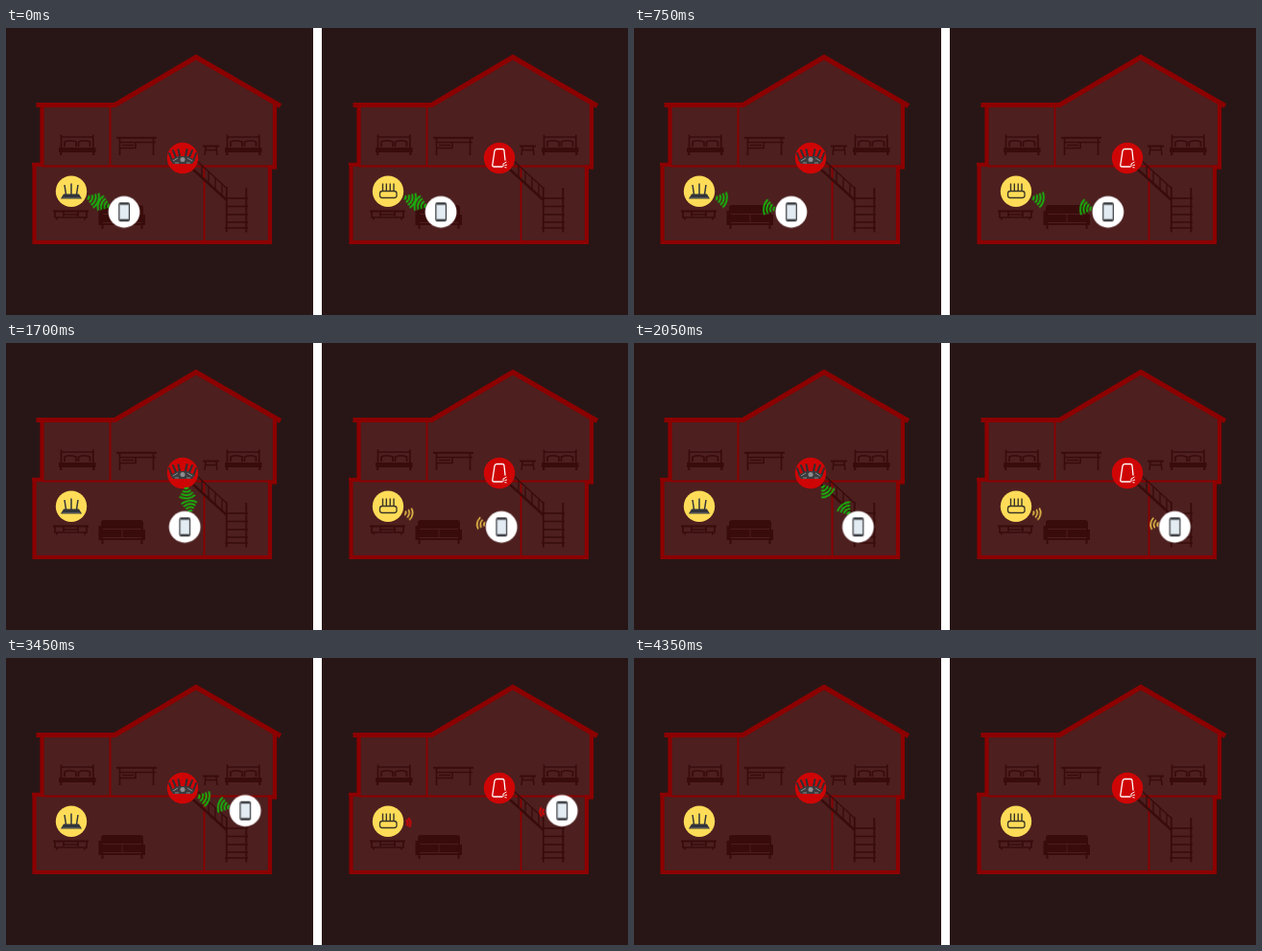
An HTML page without scripts that plays this animation: 648x300 px, repeating every 5250 ms.

```html
<!DOCTYPE html>
<html lang="en">
<head>
<meta charset="utf-8">
<title>Home coverage</title>
<style>
html, body { margin: 0; width: 100%; height: 100%; overflow: hidden; background: #fff; }
svg { display: block; }
.live, .live * { animation: 5250ms linear infinite; }
.live { animation-name: leave; }
.live .phone { animation-name: walk; }
.live .near { animation-name: near; }
.live .far { animation-name: far; }
.live .hub { animation-name: hub; }
.live .toHub { animation-name: toHub; }
.live .strong { animation-name: strong; }
.live .boost { animation-name: boost; }
.live .fair { animation-name: fair; }
.live .weak { animation-name: weak; }

@keyframes walk {
  0% { transform: translate(123px, 192.3px); animation-timing-function: cubic-bezier(.3, .25, .55, 1); }
  15.9% { transform: translate(164.4px, 192.3px); }
  25.71% { transform: translate(164.4px, 192.3px); animation-timing-function: ease-in-out; }
  44.76% { transform: translate(249.2px, 192.3px); }
  57.14% { transform: translate(249.2px, 192.3px); animation-timing-function: ease-in-out; }
  76.19%, 100% { transform: translate(249.2px, 113.8px); }
}
@keyframes leave {
  0%, 77.14% { opacity: 1; }
  82.86%, 100% { opacity: 0; }
}
/* waves at the main router, and the phone's waves towards it */
@keyframes near {
  0% { transform: translate(82.5px, 176px) rotate(21deg); animation-timing-function: ease-out; }
  15.9%, 25.71% { transform: translate(82.5px, 177px) rotate(12deg); }
  44.76% { transform: translate(82.5px, 177.5px) rotate(7deg); }
  57.14% { transform: translate(82.5px, 177.5px) rotate(7deg); animation-timing-function: ease-in; }
  65.71% { transform: translate(82.5px, 172.5px) rotate(-4deg); animation-timing-function: ease-out; }
  74.29%, 100% { transform: translate(82.5px, 168px) rotate(-17deg); }
}
@keyframes far {
  0% { transform: translate(-13px, -5px) rotate(201deg); animation-timing-function: ease-out; }
  15.9%, 25.71% { transform: translate(-14.5px, -2.5px) rotate(192deg); }
  44.76% { transform: translate(-14px, -2px) rotate(187deg); }
  57.14% { transform: translate(-14px, -2px) rotate(187deg); animation-timing-function: ease-in; }
  65.71% { transform: translate(-14px, 1px) rotate(177deg); animation-timing-function: ease-out; }
  74.29%, 100% { transform: translate(-14px, 7px) rotate(163deg); }
}
/* waves at the upstairs hub, and the phone's waves towards it */
@keyframes hub {
  0%, 25.71% { transform: translate(186px, 148px) rotate(105deg); }
  32.38% { transform: translate(187.5px, 148px) rotate(84deg); animation-timing-function: ease-out; }
  44.76% { transform: translate(197.7px, 146.7px) rotate(43deg); }
  57.14% { transform: translate(197.7px, 146.7px) rotate(43deg); animation-timing-function: ease-in; }
  65.71% { transform: translate(197.6px, 143.8px) rotate(17deg); animation-timing-function: ease-out; }
  74.29%, 100% { transform: translate(197.6px, 132.7px) rotate(-17deg); }
}
@keyframes toHub {
  0%, 25.71% { transform: translate(10px, -12px) rotate(285deg); }
  32.38% { transform: translate(6px, -13px) rotate(264deg); animation-timing-function: ease-out; }
  44.76% { transform: translate(-13px, -11px) rotate(223deg); }
  57.14% { transform: translate(-13px, -11px) rotate(223deg); animation-timing-function: ease-in; }
  65.71% { transform: translate(-14px, -3px) rotate(195deg); animation-timing-function: ease-out; }
  74.29%, 100% { transform: translate(-14px, 10px) rotate(163deg); }
}
@keyframes strong {
  0%, 24.76% { opacity: 1; }
  28.57%, 100% { opacity: 0; }
}
@keyframes boost {
  0%, 24.76% { opacity: 0; }
  28.57%, 100% { opacity: 1; }
}
@keyframes fair {
  0%, 24.76% { opacity: 0; }
  28.57%, 44.76% { opacity: 1; }
  50.48%, 100% { opacity: 0; }
}
@keyframes weak {
  0%, 44.76% { opacity: 0; }
  50.48%, 100% { opacity: 1; }
}
</style>
</head>
<body>
<svg width="648" height="300" viewBox="0 0 648 300" fill="none">
  <defs>
    <g id="green" stroke="#17b50d" stroke-width="1.9">
      <path d="M3.3-2.3A4 4 0 0 1 3.3 2.3M6.2-4.3A7.5 7.5 0 0 1 6.2 4.3M9-6.3A11 11 0 0 1 9 6.3M11.9-8.3A14.5 14.5 0 0 1 11.9 8.3"/>
    </g>
    <g id="yellow" stroke="#f2c94c" stroke-width="1.5">
      <path d="M3.3-2.3A4 4 0 0 1 3.3 2.3M6.2-4.3A7.5 7.5 0 0 1 6.2 4.3M9-6.3A11 11 0 0 1 9 6.3"/>
    </g>
    <g id="red" stroke="#cf0808" stroke-width="2">
      <path d="M4.9-3.2A6 6 0 0 1 4.9 3.2M7.2-4.9A8.7 8.7 0 0 1 7.2 4.9"/>
    </g>

    <g id="handset">
      <circle r="16.4" fill="#fff"/>
      <rect x="-5.2" y="-9.5" width="10.6" height="19" rx="1.4" fill="#e4ecf3" stroke="#36383c" stroke-width="1.2"/>
      <path d="M-4.6-8.3H4.8M-4.6 8.3H4.8" stroke="#36383c" stroke-width="1.4"/>
    </g>

    <g id="bed" stroke="#390c0c">
      <path d="M57.5 126V111.5M90.8 126V111.5M57 114H91M61 124V119Q66 116.500 73 119V124M75.500 124V119Q82 116.500 87.500 119V124" stroke-width="1.7"/>
      <path d="M55 127.500H93.500" stroke-width="5"/>
      <path d="M57.200 129V133M91.300 129V133" stroke-width="2.200"/>
    </g>

    <g id="house">
      <path d="M38 80H113L198 30L280 80V145H275V224H29V143H38Z" fill="#4d1f1f"/>
      <path d="M108.500 80V144M38 144.500H278M206.500 144V223" stroke="#8c0000" stroke-width="1.8"/>

      <use href="#bed"/>
      <use href="#bed" x="173"/>
      <g stroke="#390c0c">
        <path d="M115 114.800H157" stroke-width="2"/>
        <path d="M118.500 115V133M153.500 115V133M118 119.500H156M119 125.500H135V120M121 122.500H133" stroke-width="1.6"/>
        <path d="M205 123.500H222" stroke-width="2"/>
        <path d="M208 124L207 133M219 124L220 133M208 127.500H219" stroke-width="1.5"/>
        <path d="M49 191.500H86" stroke-width="2"/>
        <path d="M51 191V198H84V191M60 192V197M75 192V197M60 195H75M53 198V200.500M82 198V200.500" stroke-width="1.7"/>
        <path d="M195 148L230 180" stroke-width="2.400"/>
        <path d="M199 139L230 167.500M204 144V155M211 150.500V162M218 157V168M225 163V175" stroke-width="1.3"/>
        <path d="M229.800 166V213.500M250.300 167V213.500" stroke-width="1.800"/>
        <path d="M228 178H252M229 186.500H252M229 195H252M229 203H252M228 209H252" stroke-width="1.5"/>
      </g>
      <path d="M99 195V188Q99 185 102 185H140Q143 185 143 188V195H145V206H142.500V210H140.500V206H101.500V210H99.500V206H96.500V191H99Z" fill="#390c0c"/>
      <path d="M101 194.500H141M101 203.500H141M121 195V203" stroke="#532323" stroke-width=".8"/>

      <path d="M37.500 82V143H29.500V224H275V145.500H280V80" stroke="#8c0000" stroke-width="4.200"/>
      <path d="M27 142.500H38M274 145.500H282" stroke="#8c0000" stroke-width="3.500"/>
      <path d="M31.500 80.500H113.500L198 30.500L286 81.500" stroke="#8c0000" stroke-width="5"/>

      <circle cx="68" cy="170.800" r="16.200" fill="#ffdc58"/>
      <circle cx="184" cy="136" r="16.200" fill="#cf0505"/>
    </g>
  </defs>

  <rect width="320" height="300" fill="#281616"/>
  <rect x="329" width="319" height="300" fill="#281616"/>

  <g>
    <use href="#house"/>
    <path d="M60 173.500H76L79 178.500H57Z" fill="#32343a"/>
    <path d="M62.500 174L61 164M68 174V162.500M73.500 174L75 164" stroke="#32343a" stroke-width="1.500"/>
    <path d="M59 177.500H77" stroke="#66686c" stroke-width=".7"/>
    <g stroke="#302e31" stroke-linecap="round">
      <path d="M173 139L170 131M177 135L174 128M181 134L179.500 127M187 134L188.500 127M191 135L194 128M195 139L198 131" stroke-width="2"/>
    </g>
    <path d="M171 138L179 134H189L197 138L194 142H174Z" fill="#3c3b3d"/>
    <path d="M174 139L179 136M194 139L189 136M176 141H180M188 141H192" stroke="#8a8888"/>
    <circle cx="184" cy="137.500" r="2.500" fill="#8e8d8f"/>
    <g class="live">
      <g class="strong"><g class="near"><use href="#green"/></g></g>
      <g class="boost"><g class="hub"><use href="#green"/></g></g>
      <g class="phone">
        <g class="strong"><g class="far"><use href="#green"/></g></g>
        <g class="boost"><g class="toHub"><use href="#green"/></g></g>
        <use href="#handset"/>
      </g>
    </g>
  </g>

  <g transform="translate(330)">
    <use href="#house"/>
    <rect x="59.500" y="170.500" width="17.500" height="7" rx="2.500" stroke="#3b3527" stroke-width="1.300"/>
    <path d="M62.500 170V162.500M66.300 170V162.500M70.200 170V162.500M74 170V162.500" stroke="#3b3527" stroke-width="1.400"/>
    <path d="M187 145H178.500Q176.500 145 176.800 143L179 128.500Q179.400 126.500 181.400 126.500H187Q189 126.500 189 128.500L190 138" stroke="#fff" stroke-width="1.300" stroke-linecap="round"/>
    <path d="M188 145V142L191.500 140M189.500 143.500L192 143M189.500 145.500L191.500 146" stroke="#fff"/>
    <g class="live">
      <g class="near">
        <use class="strong" href="#green"/>
        <use class="fair" href="#yellow"/>
        <use class="weak" href="#red"/>
      </g>
      <g class="phone">
        <g class="far">
          <use class="strong" href="#green"/>
          <use class="fair" href="#yellow"/>
          <use class="weak" href="#red"/>
        </g>
        <use href="#handset"/>
      </g>
    </g>
  </g>
</svg>
</body>
</html>
```
